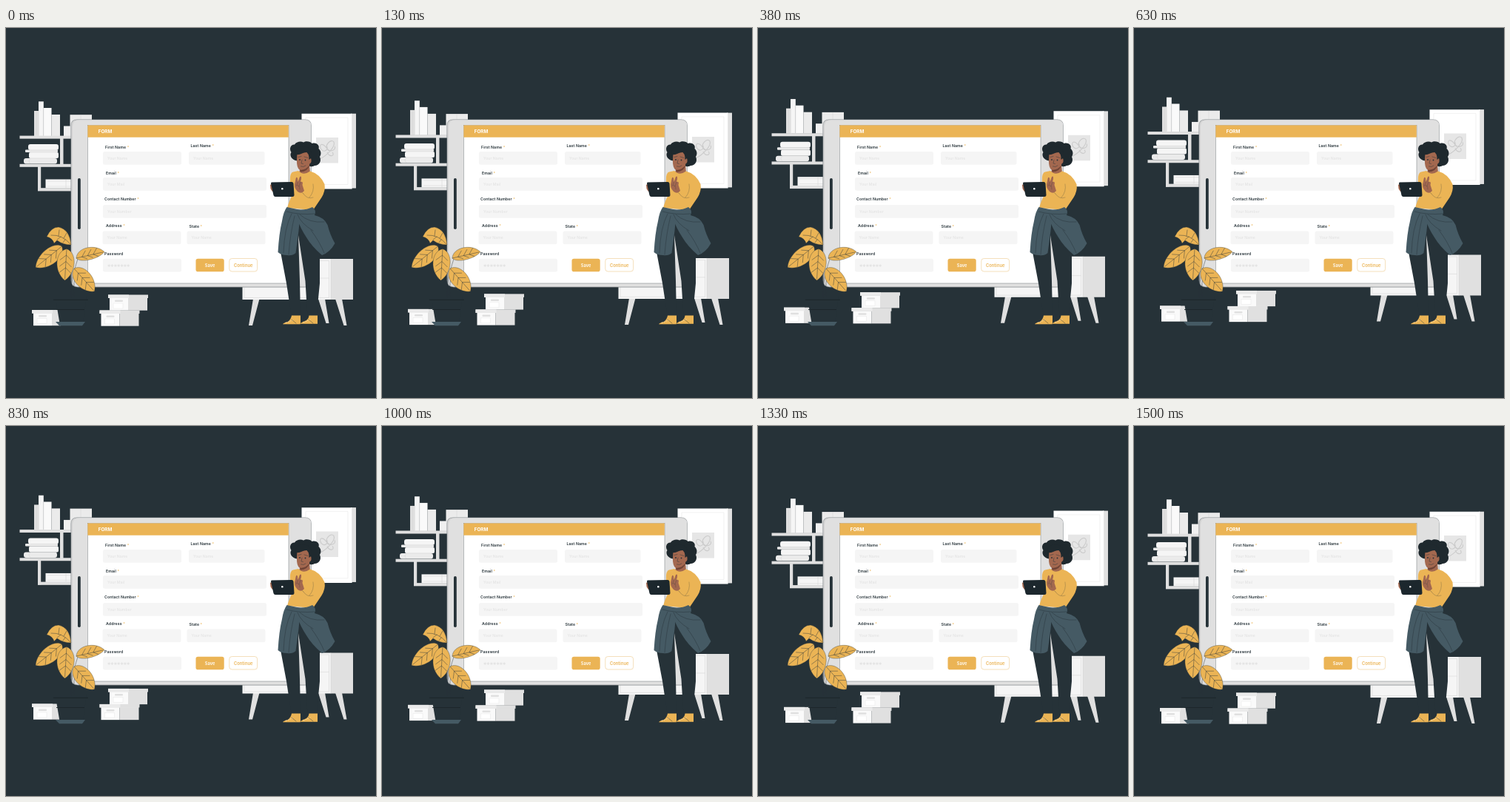
An HTML page that plays this animation: 500 px wide and 500 px high, repeating every 1.54 s.

```html
<!DOCTYPE html>
<html lang="en">
<head>
<meta charset="utf-8">
<title>Form</title>
<style>
html, body { margin: 0; width: 100%; height: 100%; overflow: hidden; background: #263238; }
svg { display: block; width: 100vw; height: 100vh; }
text { font-family: Inter, sans-serif; font-weight: 600; }
.line { fill: none; stroke: #263238; stroke-width: .45; stroke-linecap: round; stroke-linejoin: round; }
.thin { fill: none; stroke: #d0d0d0; stroke-width: .5; }
.leaf { fill: #ebb455; stroke: #263238; stroke-width: .35; }
.skin { fill: #a3684f; }
.hair { fill: #1f292e; }
.cloth { fill: #455a64; }
</style>
</head>
<body>
<svg viewBox="0 0 500 500" xmlns="http://www.w3.org/2000/svg">
  <rect width="500" height="500" fill="#263238"/>

  <g id="float">
    <g id="shelf"></g>

    <g id="picture">
      <path fill="#e0e0e0" d="M466 115.700H473V216.500H466z"/>
      <path fill="#fff" d="M399.500 115.700H467.500V217.500H399.500z"/>
      <path class="thin" d="M467.500 116V217.500M405 121H462V211.500H405z" stroke-opacity=".55"/>
      <path fill="#e6e6e6" d="M419 148H449V182.500H419z"/>
      <path fill="none" stroke="#cbcbcb" stroke-width="1.100" d="M424 177C433 173 446 160 443 154C439 149 431 158 434 163C438 169 447 164 444 160M436 166C427 152 422 158 426 164C430 169 437 164 433 159M434 168C438 176 445 172 441 168"/>
    </g>

    <g id="cabinet">
      <path fill="#e0e0e0" d="M334 366H342.500L333 402H328zM422 366H431L436.500 399H432.500zM445 366H454L460.500 402H456.500z"/>
      <path fill="#f5f5f5" d="M319.500 312H439V367H319.500z"/>
      <path fill="#e0e0e0" d="M439 312H469V367H439z"/>
      <path class="thin" d="M322 351V364.500H436.500V314.500H422M422 338H436.500M439 312V367"/>
    </g>

    <g id="boxes"></g>
  </g>

  <g id="tablet">
    <path fill="#d4d4d4" stroke="#50595e" stroke-width=".4" d="M96 123.800H404Q412.500 123.800 412.500 132V342Q412.500 350.200 404 350.200H97Q87.800 350.200 87.800 341V132Q87.800 123.800 96 123.800z"/>
    <path fill="#e0e0e0" d="M99 124.200H404Q412.200 124.200 412.200 132V341Q412.200 349 404 349H99Q90 349 90 340V133Q90 124.200 99 124.200z"/>
    <rect x="110.200" y="131.200" width="271.800" height="213.800" fill="#fff" stroke="#50595e" stroke-width=".4"/>
    <rect x="110.400" y="131.400" width="271.400" height="16.300" fill="#ebb455"/>
    <rect x="97" y="203" width="3.800" height="69" rx="1.800" fill="#263238"/>
    <g id="form"></g>
  </g>

  <g id="plant">
    <path fill="#263238" d="M68 362H109L104 399H72.500L68 372z"/>
    <path d="M64 367.300H111M68 380.500H106" stroke="#1b2529" stroke-width=".9"/>
    <path class="cloth" d="M67 397H107L103 402.300H72z"/>
    <path class="line" d="M88 364C87 340 94 322 98 309M90 362C84 340 86 320 82 300M92 362C91 344 93 332 96 325M88 350C89 320 92 308 75 295"/>
    <g id="leaves"></g>
  </g>

  <g id="person">
    <path fill="#263238" d="M378 250H417L424 298V345L419.500 391H407.500L406 367L404.500 342L395 280L397 342L398 391H386L379 345L370.500 300z"/>
    <path fill="#ebb455" d="M386 388.500H398V400.500H374Q375 398 381 397Q385 394 386 388.500z"/>
    <path fill="#ebb455" d="M409.500 388.500H421V400H397.500Q399 397.500 404 396Q409 394 409.500 388.500z"/>
    <path d="M378 398.500L389 394M402 398L413 393" stroke="#fff4dd" stroke-width="1" stroke-dasharray="1 2"/>
    <path class="line" d="M374 400.500H398M397.500 400H421M386 394L392 399M409 394L415 399"/>

    <path class="hair" d="M391 179C385 177 383 171 385.500 168C382 163 385 157 390 157.500C393 153 399 153 402 154.500C406 152 412 154 413.500 156C420 154 424 159 422.500 163C427 167 425.500 172 424 174C427 180 423 186 417 186C412 189 406 186 405 182z"/>
    <path class="skin" d="M393.500 168Q402 170 409 167L412 176Q414 181 410 184L411 196Q403 204 396 195L397 192Q392.500 189 393 178z"/>
    <path fill="#6f4335" d="M397 191.500Q404 193 410 185.500Q408 194 398 194.500z"/>
    <path class="hair" d="M391 171Q391 160 403 160Q414 162 413.500 175L409.500 178Q410 169 404.500 167Q398 172 391 171z"/>
    <path class="line" d="M395 174.500L399 173.500M403 174L408 175.500M400 178L399 183L401.500 183.500M398.500 187Q402 188.500 405 186"/>
    <circle cx="397" cy="178" r=".9" fill="#263238"/>
    <circle cx="404.500" cy="178.500" r=".9" fill="#263238"/>

    <path fill="#ebb455" d="M388 194.500L395 193Q402 200 411 193.500Q424 197 430.500 211Q432 220 426.500 229L415 246L380 243Q383 232 388 224Q383 214 384 201Q385 195 388 194.500z"/>
    <path class="line" d="M415 211Q417 221 410 229M402 224Q407 232 415 229M402 224L397 220" stroke-opacity=".55"/>
    <path class="skin" d="M357 212Q360 209 364 214L365 221Q360 223 357.500 217zM391 207Q392 199 394 203L394.500 208L397 201Q399.500 199 399 204L398 208Q402 207 400.500 212L403 220Q399 225 394 221Q388 215 391 207z"/>
    <path class="line" d="M394.500 208L393 212M398 208L396 214M392 213Q397 211 397 218" stroke-opacity=".55"/>
    <path fill="#1c272d" d="M359 208.500L386 208Q388 208 388.500 210L389.500 226Q389.500 228 387 228H364Q362 228 361.500 226L358 210Q358 208.500 359 208.500z"/>
    <circle cx="373.300" cy="217.200" r="1.300" fill="#fff"/>

    <path class="cloth" d="M379.500 242L398 246Q396 275 391.500 304Q387 308 380 307Q372 307 367.500 303Q369 277 373 261Q375 248 379.500 242z"/>
    <path class="cloth" d="M392 245Q404 247 414 242Q420 246 417 253Q430 256 434.500 266Q438 280 444.500 291Q438 303 427 307Q413 295 406 283Q398 271 393 257z"/>
    <path class="line" d="M379 248Q397 253 417 251M394 252Q398 264 415 274M397 252Q410 264 430 262M390 254Q384 278 382 306M386 251Q376 270 375 304M412 273Q424 289 430 304"/>
  </g>
</svg>
<script>
const STEPS = 37, LOOP = 1540, PERIOD = 1500, RISE = 6.67, LEAD = 20;
const byId = id => document.getElementById(id);
const fill = (id, parts) => { byId(id).innerHTML = parts.join(''); };
const rect = (x, y, w, h, color, r = 0, extra = '') =>
  `<rect x="${x}" y="${y}" width="${w}" height="${h}" rx="${r}" fill="${color}" ${extra}/>`;
const text = (x, y, size, color, s, extra = '') =>
  `<text x="${x}" y="${y}" font-size="${size}" fill="${color}" ${extra}>${s}</text>`;
const path = (d, cls) => `<path class="${cls}" d="${d}"/>`;

const GREY = '#e0e0e0', PALE = '#f5f5f5', MID = '#ebebeb', GOLD = '#ebb455';

fill('shelf', [
  rect(38, 112, 6.500, 34, GREY), rect(44, 99.300, 6.800, 46.700, PALE),
  rect(50.800, 108, 10.700, 38, '#fafafa'), rect(61.500, 117, 11.500, 29, MID),
  rect(78, 132.500, 10, 13.500, '#f0f0f0'), rect(86.500, 117.200, 29.500, 28.800, MID),
  path('M50.800 108V146M44.200 112V146M101 117.500V146M41 114V144', 'thin'),
  rect(30, 157, 41, 8, PALE, 3), rect(26, 164.500, 44, 3.500, MID, 1),
  rect(31, 168, 40, 8, PALE, 2), rect(24, 176, 45, 7.500, MID, 3),
  path('M33 165H70M31 168H70M33 176H69M33 176.500Q29 180 33 183', 'thin'),
  rect(53.500, 204.500, 36, 12, PALE),
  path('M56 207H88M56 214H88M81 205V216', 'thin'),
  rect(18.500, 145.600, 75, 4, GREY), rect(73, 149, 4.500, 36, GREY),
  rect(18.500, 183.800, 75, 4, GREY), rect(43, 187, 4.200, 33, GREY),
  rect(43, 216.200, 50, 4.200, GREY)
]);

// Carton with a lid, a shaded side and a label
const carton = (x, y, side) => [
  rect(x + 27, y + 2, side, 19.200, GREY),
  rect(x + 2, y + 4, 25, 17.200, '#fafafa'),
  rect(x, y, 28 + side, 4.500, GREY), rect(x, y, 28, 4.500, MID),
  rect(x + 9, y + 7, 11, 2.500, GREY, 1),
  rect(x + 7, y + 11.500, 13, 7, '#fff', 0, 'stroke="#e6e6e6" stroke-width=".5"')
].join('');
fill('boxes', [carton(35, 381, 12), carton(138, 360.500, 26), carton(126.500, 381.500, 26)]);

const fields = [
  // label, x, y, box x, box y, box width, hint
  ['First Name', 134, 162.500, 131, 167, 106, 'Your Name'],
  ['Last Name', 249.500, 161.200, 247, 167, 102.500, 'Your Name'],
  ['Email', 135, 197.600, 131, 202, 221, 'Your Mail'],
  ['Contact Number', 133, 233.200, 131, 239, 221, 'Your Number'],
  ['Address', 135, 269, 130.500, 274.500, 106, 'Your Name'],
  ['State', 247.500, 270.400, 244.500, 274.500, 106, 'Your Name'],
  ['Password', 133, 306.800, 131, 311.800, 106, '✱✱✱✱✱✱✱']
];
const field = ([label, x, y, bx, by, w, hint]) => {
  const star = label === 'Password' ? '' : `<tspan fill="${GOLD}" font-weight="400"> *</tspan>`;
  return text(x, y, 5.200, '#263238', label + star, 'letter-spacing=".1"') +
    rect(bx, by, w, 17.800, PALE, 2.500) +
    text(bx + 6, by + 10.800, 5.200, '#e3e3e3', hint, 'style="font-weight:500"');
};
fill('form', [
  text(124.800, 142.400, 6.300, '#fff', 'FORM', 'style="font-weight:700"'),
  ...fields.map(field),
  rect(256.500, 311.800, 38.200, 17.400, GOLD, 2.800),
  text(275.600, 322.900, 5.700, '#fff', 'Save', 'text-anchor="middle"'),
  rect(301.800, 311.500, 37.800, 17.500, '#fff', 3.500, 'stroke="#ecc98d" stroke-width=".6"'),
  text(320.700, 322.900, 5.800, GOLD, 'Continue', 'text-anchor="middle"')
]);

// Leaf from base to tip: two bulging edges, a midrib and side veins
function leaf(x, y, tx, ty, left, right) {
  const dx = tx - x, dy = ty - y, len = Math.hypot(dx, dy);
  const at = (u, v) => `${(x + dx * u - dy / len * v).toFixed(1)} ${(y + dy * u + dx / len * v).toFixed(1)}`;
  const edge = (a, b, v) => `C${at(a, v)} ${at(b, v)}`;
  const veins = [.2, .4, .6].map(u =>
    `M${at(u + .16, -left * .5)}L${at(u, 0)}L${at(u + .16, right * .5)}`).join('');
  return path(`M${at(0, 0)}${edge(.1, .75, -left)} ${at(1, 0)}${edge(.75, .1, right)} ${at(0, 0)}z`, 'leaf') +
    path(`M${at(0, 0)}L${at(.95, 0)}${veins}`, 'line');
}
fill('leaves', [
  path('M55 282Q61 269 71 269Q86 272 88 293Q77 293 69 287L65 291Q63 284 55 282z', 'leaf'),
  path('M61 280Q76 279 87 292M71 281L72 273M78 284L82 277M74 282L69 286M80 286L77 290', 'line'),
  leaf(75.500, 295, 40, 323.500, 15, 13),
  leaf(82, 298.500, 79.500, 341, 15, 16),
  leaf(95, 311, 133, 302.500, 14, 8),
  leaf(92, 325, 119.500, 356, 15, 15)
]);

const lift = t => RISE * (1 - Math.abs(1 - 2 * (t % PERIOD) / PERIOD));

function draw(ms) {
  const step = Math.min(STEPS - 1, Math.floor(ms % LOOP * STEPS / LOOP + .05));
  const y = lift(LEAD) - lift(step * 1000 / 24 + LEAD);
  byId('float').setAttribute('transform', `translate(0 ${y.toFixed(2)})`);
}

const start = performance.now();
function tick(now) {
  draw(Math.max(0, now - start));
  requestAnimationFrame(tick);
}
draw(0);
requestAnimationFrame(tick);
</script>
</body>
</html>
```
